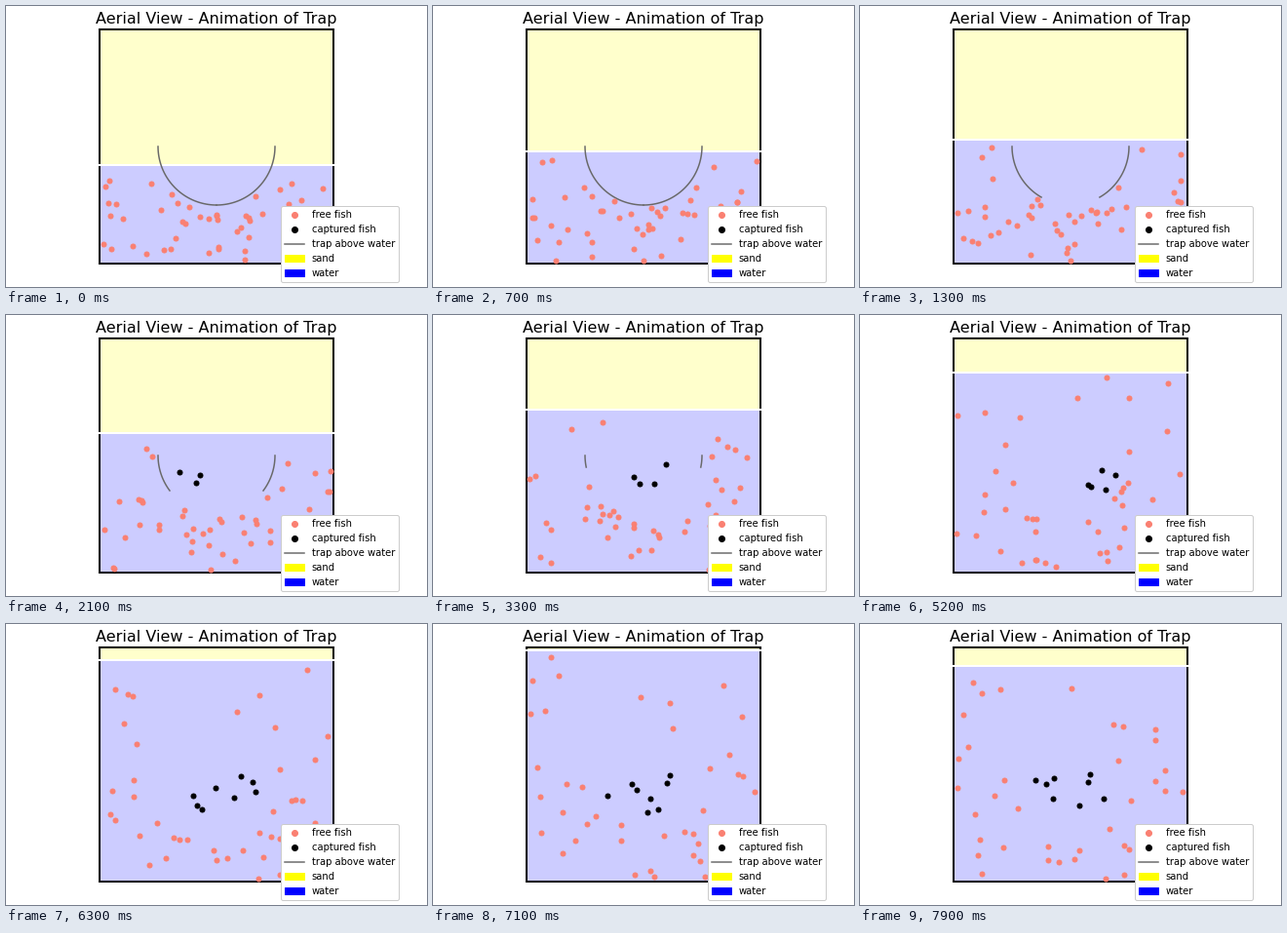
Animation of 432 by 288 pixels, one loop 8000 ms. Source, as a matplotlib script:

```python
import numpy as np
import matplotlib.pyplot as plt
from matplotlib.animation import FuncAnimation
from matplotlib.lines import Line2D
from matplotlib.patches import Patch, Rectangle

# Coordinates are stage pixels, y pointing down.
W, H, DPI = 432, 288, 72
FRAMES, INTERVAL = 80, 100
LEFT, RIGHT, TOP, BOTTOM = 96, 336, 24, 264
CX, CY, R = 216, 144, 60
FREE = 42
CATCH_TIMES = np.array([17, 18, 19, 28, 44, 56, 58, 60])


def tide(k):
    """Steps the water has risen: up for 70 frames, then back down."""
    return min(k, 139 - k)


def surface(k):
    return 163 - 2 * tide(k)


def blocked(x, y, k):
    """Outside the water or inside the trap."""
    outside = (x < 99) | (x > 333) | (y > 261) | (y < surface(k) + 4)
    return outside | ((np.hypot(x - CX, y - CY) < R + 3) & (y > CY - 3))


def swim_free(rng):
    x, y = rng.uniform((99, surface(0) + 4), (333, 261), (3 * FREE, 2)).T
    ok = ~blocked(x, y, 0)
    x, y = x[ok][:FREE], y[ok][:FREE]
    head = rng.uniform(0, 2 * np.pi, FREE)
    speed = rng.uniform(2.5, 4.5, FREE)
    track = [(x, y)]
    for k in range(1, FRAMES):
        # The school stretches with the water column.
        rise = surface(k) - surface(k - 1)
        lift = rise * (BOTTOM - y) / (BOTTOM - surface(k - 1))
        head = head + rng.normal(0, 0.5, FREE)
        nx = x + speed * np.cos(head)
        ny = y + speed * np.sin(head) + lift
        stop = blocked(nx, ny, k)
        head[stop] = rng.uniform(0, 2 * np.pi, stop.sum())
        x = np.where(stop, x, nx)
        y = np.maximum(np.where(stop, y, ny), surface(k) + 4)
        track.append((x, y))
    return np.array(track)


def swim_lured(rng):
    """Fish that circle below the trap, slip in and stay there."""
    n = len(CATCH_TIMES)
    k = np.arange(FRAMES)[:, None]
    phase = 2 * np.pi * np.arange(n) / n
    u = np.clip((k - CATCH_TIMES + 5) / 10, 0, 1)
    entry = u * u * (3 - 2 * u)
    inner = 36 + 14 * np.sin(0.11 * k + rng.uniform(0, 6, n))
    outer = 76 + 8 * np.sin(0.15 * k + rng.uniform(0, 6, n))
    radius = outer + (inner - outer) * entry
    sway = np.sin(rng.uniform(0.04, 0.09, n) * k + phase)
    angle = np.pi / 2 + (0.6 + 0.6 * entry) * sway
    pos = np.stack([CX + radius * np.cos(angle),
                    CY + radius * np.sin(angle)], axis=1)
    return pos, radius < R


rng = np.random.default_rng(7)
free = swim_free(rng)
lured, caught = swim_lured(rng)

fig = plt.figure(figsize=(W / DPI, H / DPI), dpi=DPI, facecolor="white")
ax = fig.add_axes([LEFT / W, 1 - BOTTOM / H,
                   (RIGHT - LEFT) / W, (BOTTOM - TOP) / H])
ax.set(xlim=(LEFT, RIGHT), ylim=(BOTTOM, TOP), xticks=[], yticks=[])
ax.set_title("Aerial View - Animation of Trap", fontsize=16,
             fontfamily="DejaVu Sans")
for spine in ax.spines.values():
    spine.set(linewidth=2, zorder=3)


def layer(color):
    rect = Rectangle((LEFT, TOP), RIGHT - LEFT, 0, color=color,
                     alpha=0.2, lw=0, zorder=1)
    return ax.add_patch(rect)


def curve(*style, **kw):
    return ax.plot([], [], *style, **kw)[0]


sand, water = layer("yellow"), layer("blue")
shore = curve(color="white", lw=2, zorder=4, clip_on=False)
arms = [curve(color="dimgray", lw=1.5, zorder=5) for _ in range(2)]
free_dots = curve("o", color="salmon", ms=5, zorder=6)
caught_dots = curve("o", color="black", ms=5, zorder=7)

handles = [
    Line2D([], [], marker="o", ls="", color="salmon", label="free fish"),
    Line2D([], [], marker="o", ls="", color="black", label="captured fish"),
    Line2D([], [], color="dimgray", lw=1.5, label="trap above water"),
    Patch(color="yellow", label="sand"),
    Patch(color="blue", label="water"),
]
legend = ax.legend(handles=handles, loc="lower right", fontsize=10,
                   bbox_to_anchor=(1.3, -0.1), framealpha=1)
legend.set_zorder(10)


def draw(k):
    y = surface(k)
    sand.set_height(y - TOP)
    water.set_y(y)
    water.set_height(BOTTOM - y)
    shore.set_data([LEFT, RIGHT], [y, y])

    # Each arm runs down from the trap's end to where the water covers it.
    depth = np.clip((78 - 2 * tide(k)) / R, 0, 1)
    a = np.linspace(0, np.arcsin(depth), 60)
    for arm, side in zip(arms, (-1, 1)):
        arm.set_data(CX + side * R * np.cos(a), CY + R * np.sin(a))
        arm.set_visible(depth > 0)

    free_dots.set_data(*np.hstack([free[k], lured[k][:, ~caught[k]]]))
    caught_dots.set_data(*lured[k][:, caught[k]])
    return sand, water, shore, *arms, free_dots, caught_dots


anim = FuncAnimation(fig, draw, frames=FRAMES, interval=INTERVAL,
                     repeat=True, repeat_delay=0)
plt.show()
```
